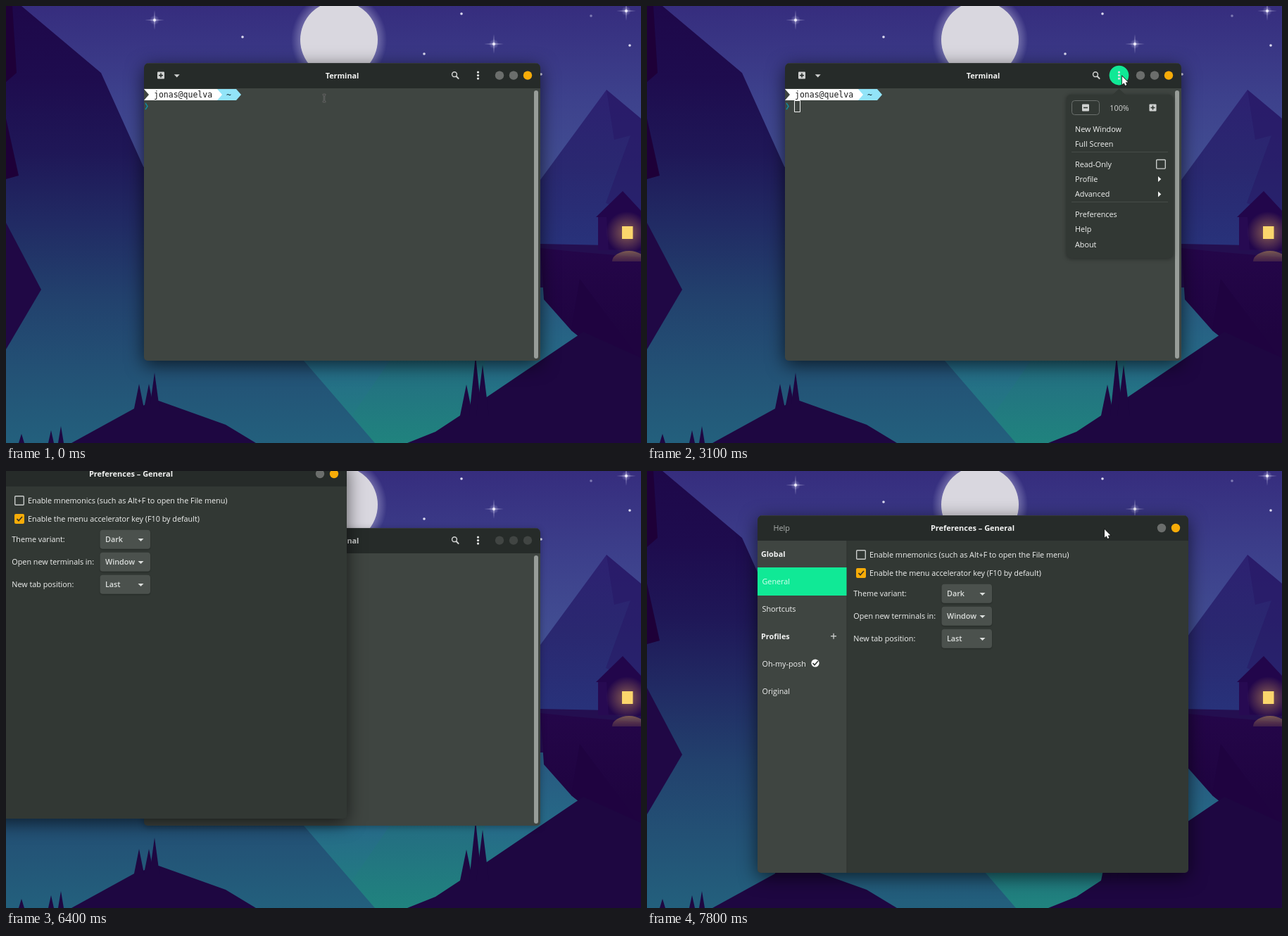
Write an HTML page with a canvas that moves like this. It is 902 by 621 pixels and loops after 8 s.

```html
<!DOCTYPE html>
<html lang="en">
<head>
<meta charset="utf-8">
<title>Terminal preferences</title>
<style>
html, body { margin: 0; width: 100%; height: 100%; overflow: hidden; background: #1e0741; }
canvas { display: block; }
</style>
</head>
<body>
<canvas id="stage" width="902" height="621"></canvas>
<script>
const W = 902, H = 621, LOOP = 8000, STEP = 100;
const SANS = '"Open Sans", "Noto Sans", sans-serif';
const MONO = '"DejaVu Sans Mono", monospace';
const HEADER = '#262b29', BODY = '#3f4541', PANEL = '#323834';
const GREEN = '#10e996', AMBER = '#f7ac08', LIGHT = '#f2f3f2', ICON = '#d0d2d1', GREY = '#6b6e6c';
const view = document.getElementById('stage').getContext('2d');
let g = view;

// ---------- helpers ----------

const ramp = (t, a, b) => Math.min(1, Math.max(0, (t - a) / (b - a)));
const easeOut = (u, power) => 1 - Math.pow(1 - u, power);
const mix = (a, b, k) => a + (b - a) * k;

function poly(fill, ...p) {
  g.beginPath();
  for (let i = 0; i < p.length; i += 2) g.lineTo(p[i], p[i + 1]);
  g.closePath();
  g.fillStyle = fill;
  g.fill();
}

function line(color, width, ...p) {
  g.beginPath();
  for (let i = 0; i < p.length; i += 2) g.lineTo(p[i], p[i + 1]);
  g.strokeStyle = color;
  g.lineWidth = width;
  g.stroke();
}

function rect(fill, x, y, w, h, r = 0) {
  g.beginPath();
  g.roundRect(x, y, w, h, r);
  g.fillStyle = fill;
  g.fill();
}

function frame(color, x, y, w, h, r = 0, width = 1) {
  g.beginPath();
  g.roundRect(x, y, w, h, r);
  g.strokeStyle = color;
  g.lineWidth = width;
  g.stroke();
}

function disc(fill, x, y, r) {
  g.beginPath();
  g.arc(x, y, r, 0, Math.PI * 2);
  g.fillStyle = fill;
  g.fill();
}

function text(s, x, y, { weight = 500, color = LIGHT, align = 'left', size = 10.8, font = SANS } = {}) {
  g.font = `${weight} ${size}px ${font}`;
  g.textAlign = align;
  g.fillStyle = color;
  g.fillText(s, x, y + 4);
}

function fade(alpha, paint) {
  g.save();
  g.globalAlpha *= alpha;
  if (alpha > 0) paint();
  g.restore();
}

function shadow(alpha, blur, dy, paint) {
  g.save();
  g.shadowColor = `rgba(0,0,0,${alpha})`;
  g.shadowBlur = blur;
  g.shadowOffsetY = dy;
  paint();
  g.restore();
}

function vertical(y0, y1, ...colors) {
  const grad = g.createLinearGradient(0, y0, 0, y1);
  colors.forEach((c, i) => grad.addColorStop(i / (colors.length - 1), c));
  return grad;
}

function glow(x, y, r0, r1, rgb, alpha) {
  const grad = g.createRadialGradient(x, y, r0, x, y, r1);
  grad.addColorStop(0, `rgba(${rgb},${alpha})`);
  grad.addColorStop(1, `rgba(${rgb},0)`);
  disc(grad, x, y, r1);
}

const caret = (x, y, color) => poly(color, x - 4, y - 2.1, x + 4, y - 2.1, x, y + 2.1);

// ---------- scenery ----------

function sparkle(x, y) {
  const ray = 'rgba(225,222,250,.6)', r = 14;
  glow(x, y, 0, 7, '215,212,250', 0.45);
  poly(ray, x - r, y, x, y - 0.8, x + r, y, x, y + 0.8);
  poly(ray, x, y - r, x + 0.8, y, x, y + r, x - 0.8, y);
  disc('#f0eefc', x, y, 2);
}

const spire = (x, top, base, half) => poly('#1e0741', x - half, base, x, top, x + half, base);

function sky() {
  rect(vertical(0, 260, '#362d7e', '#3d418c', '#435294'), 0, 0, W, H);
  for (const [x, y] of [[336, 44], [647, 11], [594, 68], [886, 56], [760, 97]]) disc('#dddcf2', x, y, 1.8);
  disc('#7f7bb4', 831, 14, 1.8);
  sparkle(211, 20);
  sparkle(693, 54);
  sparkle(881, 7);
  glow(473, 48, 53, 68, '205,202,232', 0.4);
  disc('#d9d7df', 473, 48, 55);
}

function valley() {
  poly(vertical(119, 340, '#2d2171', '#2a2870', '#28327a'), 759, 247, 853, 119, 902, 160, 902, 345, 759, 345);
  poly('rgba(38,20,98,.45)', 853, 119, 902, 160, 902, 300, 852, 280, 887, 184, 864, 190);

  rect(vertical(400, H, '#28577f', '#266b88', '#20827f'), 400, 400, 440, 221);
  poly(vertical(500, H, '#246c82', '#20837e'), 545, 504, 680, 504, 680, H, 524, H, 493, 580);

  const slope = vertical(0, H, '#1e084a', '#1e0c4e', '#1f1757', '#212b64', '#22416d', '#235175', '#23607d');
  poly(slope, 0, 0, 22, 0, 135, 95, 195, 228, 423, 504, 524, H, 0, H);
  poly('#1e0038', 0, 0, 9, 0, 15, 95, 0, 108);
  poly('#1e0038', 0, 160, 18, 241, 0, 246);
  poly('#200845', 0, 308, 50, 403, 0, 488);
}

function cabin() {
  poly('#240f50', 759, 338, 902, 341, 902, 400, 759, 400);
  poly(vertical(345, 465, '#240649', '#1f0440'), 759, 344, 808, 349, 902, 357, 902, 540, 803, 461, 764, 417);
  poly('#1f0340', 815, 388, 902, 505, 902, 540, 803, 461);
  rect('#270a52', 841, 299, 61, 48);
  poly('#22064b', 876, 263, 902, 291, 902, 348, 856, 346, 853, 300, 838, 300);
  glow(882, 322, 6, 30, '215,160,90', 0.45);
  rect('#fbd66c', 875, 313, 15.5, 18);
  g.beginPath();
  g.ellipse(885, 363, 24, 15, 0, Math.PI, 0);
  g.fillStyle = vertical(348, 363, 'rgba(190,145,80,.55)', 'rgba(150,110,80,.25)');
  g.fill();
}

function hills() {
  poly('#1e0741', 570, H, 610, 605, 648, 580, 684, 555, 820, 463, 902, 500, 902, H);
  poly('#1e0741', 93, H, 184, 571, 217, 561, 312, 595, 355, H);
  for (const [x, top] of [[654, 538], [667, 497], [677, 510]]) spire(x, top, 582, 9);
  for (const [x, top] of [[189, 537], [203, 537], [211, 521]]) spire(x, top, 572, 7);
  for (const [x, top] of [[22, 608], [64, 603], [78, 597]]) spire(x, top, H, 4);
}

// ---------- terminal ----------

function terminal(t) {
  const focus = 1 - ramp(t, 4500, 4750);
  const hover = ramp(t, 2100, 2300) * (t < 4500);
  const active = ramp(t, 2500, 2900) * (1 - ramp(t, 4500, 4730));
  const cy = 98.6;

  shadow(0.3 + 0.35 * focus, 10 + 16 * focus, 2 + 4 * focus, () => rect(BODY, 196, 81, 563, 423, [7, 7, 5, 5]));
  rect(HEADER, 196, 81, 563, 36, [7, 7, 0, 0]);
  rect('rgba(255,255,255,.06)', 201, 81, 553, 1);
  text('Terminal', 477.5, cy, { weight: 700, align: 'center', color: mix(207, 242, focus) > 225 ? LIGHT : ICON });

  badge(220, cy, '+', HEADER);
  caret(242.7, cy + 0.7, ICON);
  g.beginPath();
  g.arc(637, cy - 1.4, 3.4, 0, Math.PI * 2);
  g.strokeStyle = ICON;
  g.lineWidth = 1.5;
  g.stroke();
  line(ICON, 2, 639.4, cy + 1.2, 643.2, cy + 5);

  fade(hover, () => disc('#484c4a', 670.5, cy, 13.8));
  fade(active, () => disc(GREEN, 670.5, cy, 13.8));
  for (const dy of [-4.5, 0, 4.5]) disc('#e4e6e5', 670.5, cy + dy, 1.6);
  [GREY, GREY, AMBER].forEach((color, i) => {
    disc('#414543', 701 + 20 * i, cy, 6.2);
    fade(focus, () => disc(color, 701 + 20 * i, cy, 6.2));
  });

  poly('#92e4f8', 300, 118, 327, 118, 334, 126, 327, 134, 300, 134);
  poly('#ffffff', 196, 118, 300, 118, 307, 126, 300, 134, 196, 134, 203, 126);
  text('jonas@quelva', 210, 126, { font: MONO, size: 11.5, color: '#1c1c1c' });
  text('~', 313, 126, { font: MONO, size: 11.5, color: '#10222a' });
  line('#128ba0', 1.5, 198, 138, 201, 142.5, 198, 147);

  // Blinks while focused, hollow once the menu takes the keyboard.
  if (t >= 2700) frame('#f0f1f0', 209.5, 134.5, 8, 16);
  else if ((t + 700) % 1200 < 600) rect('#ffffff', 210, 135, 7, 15);
  rect('#989d99', 750, 120, 6, 381, 3);
}

function badge(x, y, sign, hole) {
  rect(ICON, x - 5, y - 5, 10, 10, 1);
  rect(hole, x - 3, y - 0.8, 6, 1.6);
  if (sign === '+') rect(hole, x - 0.8, y - 3, 1.6, 6);
}

// ---------- menu ----------

const GROUPS = [['New Window', 'Full Screen'], ['Read-Only', 'Profile', 'Advanced'], ['Preferences', 'Help', 'About']];
const ROW = 21.3, GAP = 7.2;

// Hover eases over the last three steps.
function heat(t, y) {
  const near = [0, 1, 2].filter(i => Math.abs(pointerAt(t - i * STEP)[1] - y) < ROW / 2);
  return near.length / 3;
}

function menu(t) {
  fade(ramp(t, 2500, 2900) * (1 - ramp(t, 4300, 4500)), () => {
    shadow(0.4, 6, 1, () => rect(PANEL, 596, 126, 151, 232, 6));
    poly(PANEL, 661, 126.5, 670.5, 117.5, 680, 126.5);
    frame('#6b706d', 603.5, 134.5, 39, 20, 4);
    badge(623, 144.5, '-', PANEL);
    badge(718.5, 144.5, '+', PANEL);
    text('100%', 671, 144.5, { align: 'center', color: ICON });

    let y = 175;
    GROUPS.forEach((group, i) => {
      if (i) {
        rect('#464c48', 603, y - ROW / 2, 137, 1);
        y += GAP;
      }
      for (const label of group) {
        fade(heat(t, y) * 0.7, () => rect(BODY, 602, y - ROW / 2, 138, ROW, 3));
        text(label, 608, y);
        if (label === 'Read-Only') checkbox(730, y);
        if (label === 'Profile' || label === 'Advanced') poly(LIGHT, 726, y - 4, 730.3, y, 726, y + 4);
        y += ROW;
      }
    });
  });
}

// ---------- preferences ----------

const checkbox = (x, y) => frame('#c9ccca', x - 6.3, y - 6.3, 12.6, 12.6, 1, 1.4);
const tick = (x, y, color) => line(color, 1.7, x - 3.5, y, x - 1, y + 2.7, x + 4, y - 3);

// Opens partly off stage, then is dragged in by the title bar.
function place(t) {
  const moving = t >= 6400;
  return [
    mix(-292, 157, moving * easeOut(ramp(t, 6180, 7000), 1.46)),
    mix(-96, 63, moving * easeOut(ramp(t, 6220, 7000), 2.785))
  ].map(Math.round);
}

function sidebar() {
  rect(BODY, 0, 36, 127, 472, [0, 0, 0, 5]);
  rect('#2c312e', 126.5, 36, 0.8, 472);
  rect(GREEN, 0, 74, 126.5, 40);
  ['Global', 'General', 'Shortcuts', 'Profiles', 'Oh-my-posh', 'Original'].forEach((label, i) => {
    const head = i % 3 === 0;
    text(label, head ? 5 : 6.5, 54.8 + 39 * i, { weight: head ? 700 : 500, color: i === 1 ? '#d8fff0' : LIGHT });
  });
  rect(ICON, 104, 171, 8, 1.3);
  rect(ICON, 107.4, 167.7, 1.3, 8);
  disc('#ffffff', 82, 210, 5.6);
  tick(82, 210, '#333936');
}

function dialog() {
  shadow(0.62, 26, 6, () => rect(PANEL, 0, 0, 612, 508, [7, 7, 5, 5]));
  rect(HEADER, 0, 0, 612, 36, [7, 7, 0, 0]);
  rect('rgba(255,255,255,.06)', 5, 0, 602, 1);
  text('Help', 22.5, 18, { color: '#aeb2b0' });
  text('Preferences – General', 305.5, 18, { weight: 700, align: 'center', size: 11 });
  disc(GREY, 574, 18, 6.2);
  disc(AMBER, 594, 18, 6.2);
  sidebar();

  checkbox(147, 56);
  text('Enable mnemonics (such as Alt+F to open the File menu)', 159, 56);
  rect(AMBER, 140, 75, 14, 14, 2);
  tick(147, 82, '#3a3422');
  text('Enable the menu accelerator key (F10 by default)', 159, 82);

  const rows = [['Theme variant:', 'Dark'], ['Open new terminals in:', 'Window'], ['New tab position:', 'Last']];
  rows.forEach(([label, value], i) => {
    const y = 111.3 + i * 32;
    text(label, 136.3, y);
    shadow(0.3, 2, 1, () => rect('#4b514d', 261.5, y - 13.5, 71.5, 27, 4));
    text(value, 269, y, { weight: 600, color: '#dcdfdd' });
    caret(319.5, y + 0.7, '#dcdfdd');
  });
}

function preferences(t) {
  if (t < 4600) return;
  const grow = t < 4800 ? 1 - Math.pow(2, (4588 - t) / 25) : 1;
  const [x, y] = place(t);
  // Painted on its own sheet so that it fades as a whole.
  g = layer;
  g.clearRect(0, 0, W, H);
  g.save();
  g.translate(x + 306, y + 254);
  g.scale(grow, grow);
  g.translate(-306, -254);
  dialog();
  g.restore();
  g = view;
  fade(grow, () => g.drawImage(layer.canvas, 0, 0));
}

// ---------- pointer ----------

// Each move: start, end, destination.
const MOVES = [
  [0, 500, 462, 105], [900, 1100, 488, 165], [1400, 1800, 711, 114],
  [1900, 2300, 675, 100], [3200, 4100, 655, 292], [5400, 5600, 601, 272]
];

function pointerAt(t) {
  if (t >= 6500) {
    const [x, y] = place(t - 12);
    return [x + 493, y + 20];
  }
  let x = 452, y = 131;
  for (const [from, to, nx, ny] of MOVES) {
    const k = easeOut(ramp(t, from, to), 2);
    x = mix(x, nx, k);
    y = mix(y, ny, k);
  }
  return [x, y];
}

function arrow(x, y) {
  g.save();
  g.translate(x, y);
  const shape = new Path2D('M0 0V11.5L2.6 9.2 4.4 13 6.4 12 4.7 8.4 8.2 8.2Z');
  g.strokeStyle = '#1b1d1c';
  g.lineWidth = 1.6;
  g.stroke(shape);
  g.fillStyle = '#ffffff';
  g.fill(shape);
  g.restore();
}

function beam(x, y) {
  for (const [color, width] of [['rgba(240,240,240,.55)', 2.2], ['#111111', 1]]) {
    line(color, width, x, y - 5, x, y + 5);
    for (const dy of [-5, 5]) line(color, width, x - 2.2, y + dy, x + 2.2, y + dy);
  }
}

function fist(x, y) {
  for (const [color, o] of [['#1b1d1c', 1], ['#ffffff', 0]]) {
    rect(color, x - 5 - o, y - 1.5 - o, 10 + 2 * o, 4.5 + 2 * o, 2);
    rect(color, x - 3.3 - o, y - 3.5 - o, 8 + 2 * o, 7.5 + 2 * o, 2);
  }
}

function pointer(t) {
  if (t >= 5800 && t < 6500) return;
  const [x, y] = pointerAt(t);
  const overMenu = t >= 2600 && t < 4500;
  if (t >= 6500 && t < 7800) fist(x, y);
  else if (y < 117 || overMenu) arrow(x, y);
  else beam(x, y);
}

// ---------- loop ----------

function sheet() {
  const c = document.createElement('canvas');
  c.width = W;
  c.height = H;
  return c.getContext('2d');
}

const layer = sheet(), backdrop = sheet();
g = backdrop;
sky();
valley();
cabin();
hills();
g = view;

const start = performance.now();
function draw() {
  const now = Math.max(0, performance.now() - start) % LOOP;
  const t = Math.floor(now / STEP) * STEP;
  g.drawImage(backdrop.canvas, 0, 0);
  terminal(t);
  menu(t);
  preferences(t);
  pointer(t);
  requestAnimationFrame(draw);
}
draw();
</script>
</body>
</html>
```
